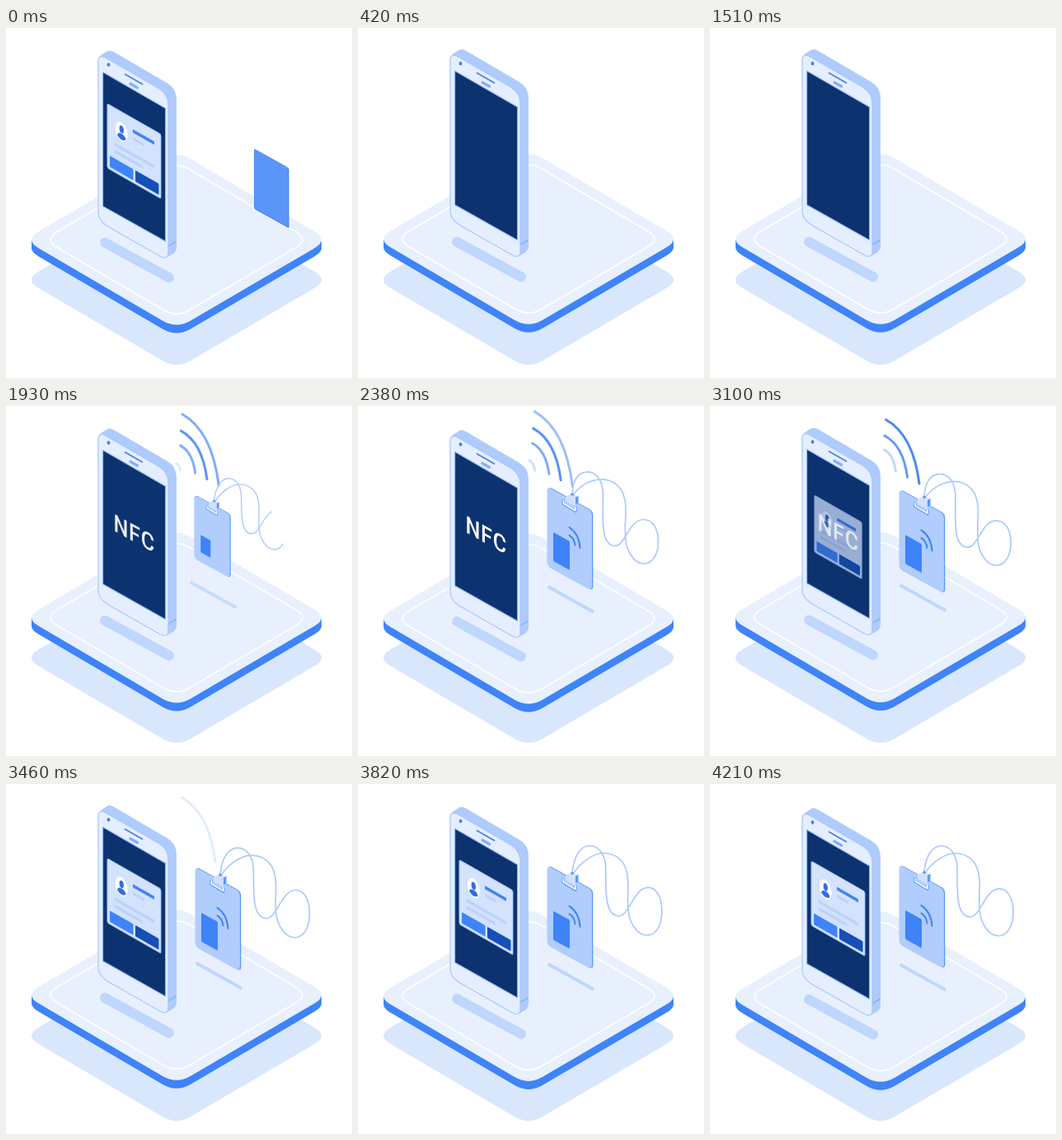
Write an HTML page that moves like this. It is 420 by 424 pixels and loops after 4.24 s.

```html
<!DOCTYPE html>
<html lang="en">
<head>
<meta charset="utf-8">
<title>NFC access</title>
<style>
  html, body { margin: 0; width: 100%; height: 100%; overflow: hidden; background: #fff; }
  svg { display: block; width: 420px; height: 424px; }
  .line { fill: none; stroke-linecap: round; stroke-linejoin: round; }
</style>
</head>
<body>
<svg viewBox="0 0 420 424" xmlns="http://www.w3.org/2000/svg">
  <path id="ground" fill="#d9e7fd"/>

  <g id="base">
    <path id="slab" fill="#3f83f8"/>
    <rect x="31" y="255.700" width="352" height="10" fill="#3f83f8"/>
    <path id="top" fill="#e8f0fe"/>
    <path id="inset" class="line" stroke="#fff" stroke-width="1.6"/>
    <path class="line" d="M120 259L198 301.5" stroke="#bfd6fd" stroke-width="12"/>
    <path id="badgeShade" class="line" d="M232 217.500L285 247" stroke="#bfd6fd" stroke-width="4"/>
  </g>

  <g id="ticket">
    <g transform="matrix(1 .557 0 1 0 -167.7)">
      <rect x="301.5" y="146.5" width="42" height="72.5" rx="1.5" fill="#3f7be8"/>
      <rect x="301" y="146" width="41.6" height="72" rx="1.5" fill="#5b95f8"/>
    </g>
  </g>

  <g id="waves" class="line" stroke="#4a89f8" stroke-width="3"></g>

  <g id="badge">
    <g transform="matrix(1 .55 0 1 0 -126.5)">
      <rect x="230.500" y="96.800" width="54.800" height="97" rx="5" fill="#5d97f8"/>
      <rect x="229.500" y="97.800" width="54.500" height="96.500" rx="5" fill="#b0cdfe"/>
      <rect id="chip" x="237" y="149" width="20" height="35" rx="1.2" fill="#3f83f8"/>
    </g>
    <g id="signal" class="line" stroke="#3f83f8" stroke-width="2">
      <path d="M256.500 147Q268.500 155 269.500 172"/>
      <path d="M256.500 156.500Q262.500 160 263.500 168.500"/>
    </g>
    <path class="line" d="M249 114.500V118.500L264 127.500V123" stroke="#5d97f8" stroke-width="3"/>
    <path class="line" d="M249.300 114.500V118L263.800 126.700V122.500" stroke="#fff" stroke-width="1.6"/>
    <path d="M263 111L267.500 108.500V117L263 120Z" fill="#5d97f8"/>
    <path d="M252 110L260 105.500L264 107.500V122L252 115.500Z" fill="#cfe0fd"/>
    <path id="cord" class="line" pathLength="100" stroke="#abcafd" stroke-width="1.7"/>
    <ellipse cx="260" cy="107" rx="1.8" ry="1.5" fill="#5d97f8"/>
  </g>

  <g id="phone">
    <path fill="#aecbfd" d="M111.500 40Q111.500 34 116 31L122 27Q126 24.500 131 27.500L196 65.500Q207 72 207 85V264Q207 269 203 272L196 276L150 240L112 100Z"/>
    <path class="line" d="M197 262.500L206.500 257" stroke="#8ab0f8" stroke-width="1.5"/>
    <path fill="#e5eefe" stroke="#a9c7fc" stroke-width="1.2" d="M112 40Q112 30.500 120 34L186 72Q197 79 197 92V270Q197 280 187 275L122 238Q112 231 112 222Z"/>
    <path fill="#0c3270" stroke="#8fb5fb" stroke-width="1.1" stroke-linejoin="round" d="M117.600 52L193.600 95.800V257L117.600 214.300Z"/>
    <ellipse cx="124.500" cy="43" rx="1.9" ry="2.3" fill="#4a7fe0"/>
    <path class="line" d="M144.500 54.500L165.500 66.500" stroke="#4a7fe0" stroke-width="1.7"/>
    <path class="line" d="M151 66L159.500 70.800" stroke="#86aff9" stroke-width="3.4"/>

    <g id="profile">
      <g transform="matrix(1 .569 0 1 0 -70)">
        <rect x="123" y="90" width="65" height="78" rx="2" fill="#d3e2fd" stroke="#a2c2fa"/>
        <ellipse cx="140.300" cy="114.500" rx="7.5" ry="11.500" fill="#fff"/>
        <ellipse cx="140.300" cy="111.500" rx="2.7" ry="4.600" fill="#2f6fe4"/>
        <path d="M135 121Q136 116.500 140.300 116.500Q144.600 116.500 145.600 121Q140.300 127 135 121Z" fill="#2f6fe4"/>
        <rect x="154" y="103.500" width="26" height="4" fill="#3f83f8"/>
        <g fill="#bcd3fb">
          <rect x="154" y="113" width="14" height="3.600"/>
          <rect x="131.500" y="132" width="48.500" height="4"/>
          <rect x="131.500" y="140.500" width="35" height="4"/>
        </g>
        <rect x="126" y="151.500" width="28.500" height="13.500" rx="1" fill="#3f83f8"/>
        <rect x="157" y="151.500" width="28.500" height="13.500" rx="1" fill="#1550b8"/>
      </g>
    </g>
    <text id="label" transform="matrix(.87 .48 0 1 130.500 149.300)" font-family="Roboto, Arial, sans-serif" font-size="29" font-weight="500" letter-spacing=".8" fill="#fff">NFC</text>
  </g>
</svg>

<script>
const LOOP = 4240, SWING = 1800, SETTLED = 420, WAKE = 1530;
const $ = id => document.getElementById(id);
const set = (el, attrs) => { for (const k in attrs) el.setAttribute(k, attrs[k]); };
const ramp = (t, start, span) => Math.min(1, Math.max(0, (t - start) / span));
const easeOut = x => 1 - (1 - x) ** 3;
const lerp = (a, b, k) => a + (b - a) * k;

// Rhombus with rounded corners; k is the share of each edge that is cut
function rhomb(cx, cy, a, b, k) {
  const tips = [[cx, cy - b], [cx + a, cy], [cx, cy + b], [cx - a, cy]];
  const mix = (p, q) => p.map((v, i) => lerp(v, q[i], k));
  return tips.map((p, i) => {
    const before = mix(p, tips[(i + 3) % 4]), after = mix(p, tips[(i + 1) % 4]);
    return `${i ? 'L' : 'M'}${before}Q${p} ${after}`;
  }).join('') + 'Z';
}

set($('ground'), { d: rhomb(207, 305, 184.6, 108, .093) });
set($('slab'), { d: rhomb(207, 265.7, 184.6, 108, .093) });
set($('top'), { d: rhomb(207, 255.7, 184.6, 108, .093) });
set($('inset'), { d: rhomb(207, 255.5, 161, 94.5, .1) });

const arcs = Array.from({ length: 4 }, () =>
  $('waves').appendChild(document.createElementNS('http://www.w3.org/2000/svg', 'path')));
const signal = [...$('signal').children].reverse();

function bob(t) {
  if (t >= SETTLED && t < WAKE) return 0;
  const low = t < SETTLED ? SETTLED : WAKE;
  return 1.75 * (1 - Math.cos((t - low) / SWING * 2 * Math.PI));
}

// Cosine interpolation through [time, value] keys
function track(t, keys) {
  if (t <= keys[0][0]) return keys[0][1];
  for (let i = 1; i < keys.length; i++) {
    const [t0, a] = keys[i - 1], [t1, b] = keys[i];
    if (t < t1) return lerp(a, b, (1 - Math.cos((t - t0) / (t1 - t0) * Math.PI)) / 2);
  }
  return keys[keys.length - 1][1];
}

const tipKeys = [[1930, 182], [2380, 191], [2800, 194], [3100, 193], [3460, 186], [3900, 183], [4240, 184]];

// Lanyard loop; e is how far its tip sags, w how much a point follows
function cordPath(e) {
  const p = (x, y, w) => `${(x - e * w * .45).toFixed(2)} ${(y + e * w).toFixed(2)} `;
  return 'M260 106C' + p(262, 86, .2) + p(270, 75, .7) + p(281, 75, .7)
    + 'C' + p(292, 75, .7) + p(299, 86, .7) + p(300, 100, .8)
    + 'C' + p(301, 120, .9) + p(296, 161, 1.2) + p(316, 161, 1.2)
    + 'C' + p(328, 161, 1.2) + p(334, 127, 1.5) + p(351, 127, 1.5)
    + 'C' + p(361, 127, 1.5) + p(368, 138, 1.2) + p(368, 155, 1.1)
    + 'C' + p(368, 172, 1) + p(361, 184, 1) + p(350, 184, 1)
    + 'C' + p(338, 184, 1) + p(327, 168, 1) + p(327, 148, .8)
    + 'C' + p(326, 135, .8) + p(329, 122, .7) + p(326, 108, .7)
    + 'C' + p(323, 93, .7) + p(312, 84, .7) + p(298, 84, .7)
    + 'C' + p(283, 84, .7) + p(268, 97, .2) + '261 108';
}

// Arc stations from phone outwards: start x, y, end x, y
const stations = [
  [205, 77, 205.5, 77],
  [211.5, 53, 225.4, 79],
  [212, 36, 239.6, 86.3],
  [213.5, 16.5, 254, 94],
  [215.5, -5, 268, 101.5]
];
const levels = [0, .6, .85, 1, 0];

function drawWaves(t) {
  const period = 390, stop = 2983;
  const step = t < stop ? ((t - stop) / period % 1 + 1) % 1 : 0;
  arcs.forEach((arc, i) => {
    const [x0, y0, x1, y1] = stations[i].map((v, j) => lerp(v, stations[i + 1][j], step));
    const dx = x1 - x0, dy = y1 - y0;
    const fadeIn = ramp(t, 1510 + 70 * i, 150);
    const fadeOut = 1 - ramp(t, 2990 + 130 * (i - 1), 250);
    set(arc, {
      d: `M${x0} ${y0}q${dx * .82} ${dy * .24} ${dx} ${dy}`,
      opacity: lerp(levels[i], levels[i + 1], step) * fadeIn * fadeOut
    });
  });
}

function drawBadge(t) {
  const grow = easeOut(ramp(t, 1750, 450)), away = 1 - grow;
  const dy = 3.5 - bob(t + 100);
  const size = .05 + .95 * grow;
  set($('badge'), {
    transform: `translate(${257.5 - 32 * away} ${161 + dy - 20 * away}) scale(${size}) translate(-257.5 -161)`,
    opacity: Math.min(1, grow * 2)
  });
  set($('badgeShade'), { transform: `translate(${-32 * away} ${-20 * away})`, opacity: grow });
  const chip = easeOut(ramp(t, 1800, 350));
  set($('chip'), { transform: `translate(247 166.5) scale(${chip}) translate(-247 -166.5)` });
  const drawn = 50 * ramp(t, 1700, 270);
  set($('cord'), {
    d: cordPath(track(t, tipKeys) - 184 - dy),
    'stroke-dasharray': drawn < 50 ? `${drawn} ${100 - 2 * drawn} ${drawn} 0` : 'none'
  });
  signal.forEach((arc, i) => set(arc, { opacity: ramp(t, 2050 + 100 * i, 180) }));
}

function drawScreen(t) {
  const shown = t < 1000 ? 1 - ramp(t, 30, 360) ** 2 : easeOut(ramp(t, 2990, 330));
  const size = 1 - .4 * (1 - shown);
  set($('profile'), {
    transform: `translate(155.5 ${147.5 + 37 * (1 - shown)}) scale(${size}) translate(-155.5 -147.5)`,
    opacity: shown
  });
  set($('label'), { opacity: ramp(t, 1600, 360) * (1 - ramp(t, 3010, 320)) });
}

function render(t) {
  const lift = bob(t);
  set($('phone'), { transform: `translate(0 ${lift})` });
  set($('base'), { transform: `translate(0 ${lift * .6})` });
  set($('ticket'), { opacity: 1 - ramp(t, 30, 360) });
  drawWaves(t);
  drawBadge(t);
  drawScreen(t);
}

const start = performance.now();
function tick() {
  render((performance.now() - start) % LOOP);
  requestAnimationFrame(tick);
}
tick();
</script>
</body>
</html>
```
